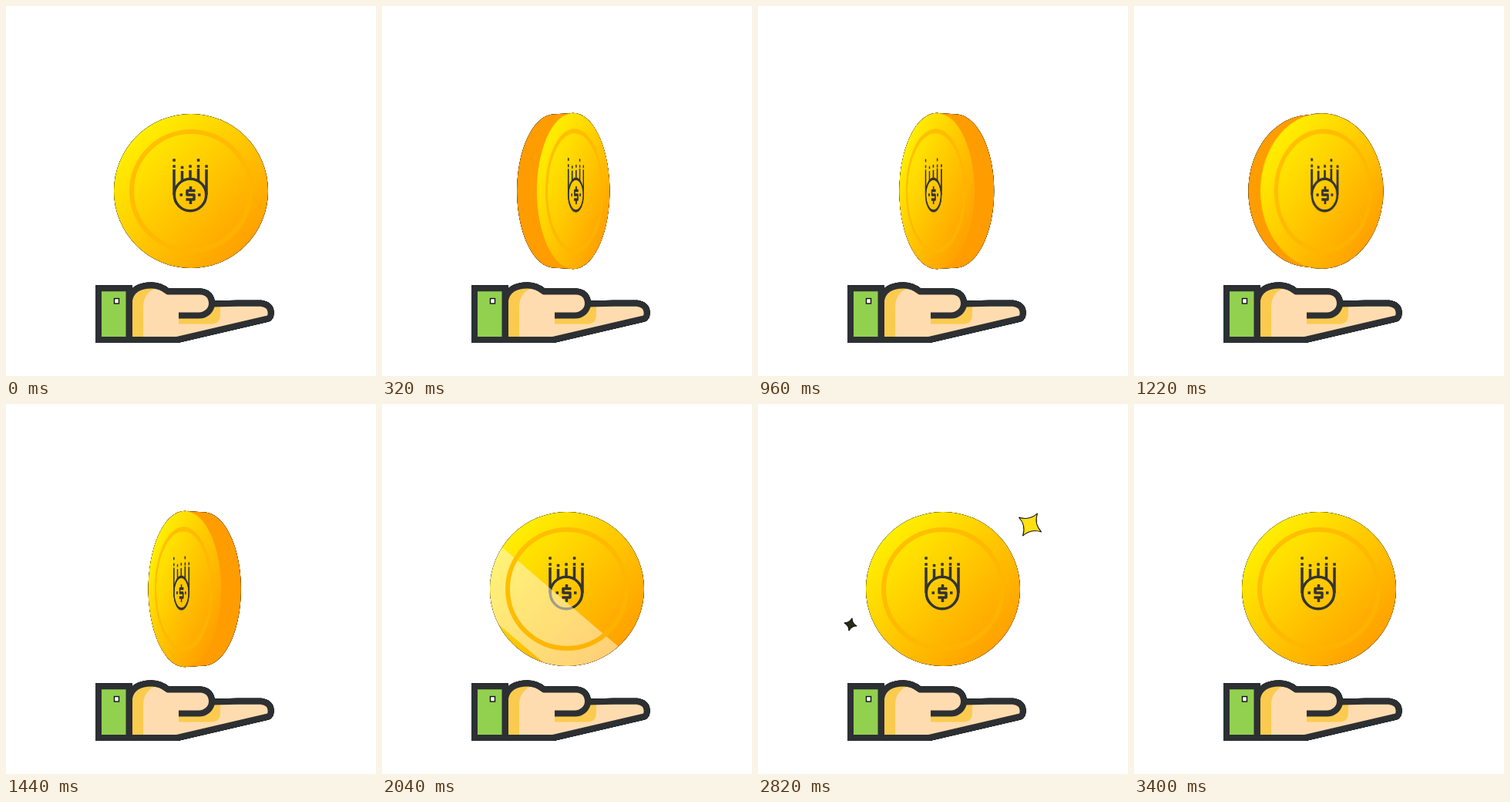
Write an HTML page with a canvas that moves like this. It is 480 px wide and 480 px high and loops after 3600 ms.

```html
<!DOCTYPE html>
<html lang="en">
<head>
<meta charset="utf-8">
<title>Spinning coin</title>
<style>
  html, body { margin: 0; width: 100%; height: 100%; overflow: hidden; background: #fff; }
  #stage { position: relative; width: 480px; height: 480px; overflow: hidden; }
  #stage > *, #coin > * { position: absolute; left: 0; top: 0; }
  .fringe { filter: drop-shadow(0 0 .5px #000) drop-shadow(0 0 .3px #000); }
  #coin { width: 480px; height: 480px; perspective: 1000px; }
  #coin #face { left: 140px; top: 140px; }
</style>
</head>
<body>
<div id="stage">
  <svg class="fringe" width="480" height="480" fill="none">
    <defs>
      <path id="palm" d="M160 382C162 370 171 362.5 189 362.5C198 362.5 204 365.5 210 370.5H252C262 371 267 377 267 386.5L300 385.8H331C339 387 343.5 391 343.5 397Q344 404 340 405.5L222 433H160Z"/>
    </defs>
    <use href="#palm" fill="#ffdcb0"/>
    <path fill="#fbcb4f" d="M162 432V378C168 366 182 364 192 367C182 372 178 380 178 392V432Z"/>
    <path fill="#fbcb4f" d="M224 400H250L268 388H278V402Q277 412.5 267 412.5H224Z"/>
    <path fill="#ffdcb0" d="M200 371H252C262 372 266 379 265 387C263 396 257 399 250 399H200Z"/>
    <g stroke="#2d3033" stroke-width="8" stroke-linejoin="round">
      <use href="#palm"/>
      <path d="M224 401.5H250C260 401.5 267 394 267 386"/>
      <path fill="#92d050" stroke-linejoin="miter" d="M120 366.3H159.5V433H120Z"/>
    </g>
    <rect x="140.5" y="379.5" width="6" height="6.5" fill="#fff" stroke="#111" stroke-width="1.4"/>
  </svg>

  <div id="coin" class="fringe">
    <canvas id="edge" width="480" height="480"></canvas>
    <svg id="face" width="200" height="200" fill="none">
      <defs>
        <linearGradient id="gold" x1=".13" y1=".13" x2=".87" y2=".87">
          <stop stop-color="#fff000"/><stop offset="1" stop-color="#ff9f00"/>
        </linearGradient>
        <linearGradient id="rim" x2="1" y2="1">
          <stop stop-color="#ffc200"/><stop offset="1" stop-color="#ffb000"/>
        </linearGradient>
        <clipPath id="disc"><circle cx="100" cy="100" r="100"/></clipPath>
      </defs>
      <circle cx="100" cy="100" r="100" fill="url(#gold)"/>
      <g stroke="#333" stroke-width="3.5">
        <circle cx="99" cy="105" r="20.7"/>
        <path d="M78 72V105M88.5 74V88M99 73V84M109.5 71V88M120 72V105"/>
        <path stroke-linejoin="round" d="M105.5 99.5H95V105H104V111H93.5M99.5 94V99M99.5 111V117"/>
        <path stroke-dasharray="3.5 50" d="M76.3 60h4M76.3 68h4M86.8 69.5h4M97.3 68h4M107.8 60h4M107.8 68h4M118.3 68h4M85.5 105h4M109 105h4"/>
      </g>
      <g clip-path="url(#disc)">
        <g transform="translate(100 100) rotate(40.5)">
          <rect id="shine" x="-120" width="240" height="79" fill="#fffae0" fill-opacity=".53"/>
        </g>
      </g>
      <circle cx="100" cy="100" r="77" stroke="url(#rim)" stroke-width="6"/>
    </svg>
  </div>

  <svg width="480" height="480" stroke="#111">
    <path id="starR" fill="#ffe014"/>
    <path id="starL" fill="#2b2b10"/>
  </svg>
</div>
<script>
const LOOP = 3600, STEP = 20;
const SPIN = 1760, RAMP = 312, TURN = 540;
const R = 100, HALF = 14, DEPTH = 1000, SIDES = 96;
const $ = id => document.getElementById(id);
const ctx = $('edge').getContext('2d');

// Constant speed with an even ramp at both ends.
function spinAngle(t) {
  if (t >= SPIN) return TURN;
  const v = TURN / (SPIN - RAMP);
  if (t < RAMP) return v * t * t / (2 * RAMP);
  if (t > SPIN - RAMP) return TURN - v * (SPIN - t) ** 2 / (2 * RAMP);
  return v * (t - RAMP / 2);
}

function track(keys, t) {
  if (t <= keys[0][0]) return keys[0][1];
  for (let i = 1; i < keys.length; i++) {
    const [t0, a] = keys[i - 1], [t1, b] = keys[i];
    if (t < t1) return a + (b - a) * (t - t0) / (t1 - t0);
  }
  return keys[keys.length - 1][1];
}

// Adds a polygon, always wound the same way so that overlaps merge.
function addPolygon(path, pts) {
  const area = pts.reduce((sum, [x, y], i) => {
    const [u, v] = pts[(i + 1) % pts.length];
    return sum + x * v - u * y;
  }, 0);
  const order = area < 0 ? [...pts].reverse() : pts;
  order.forEach((p, i) => i ? path.lineTo(...p) : path.moveTo(...p));
  path.closePath();
}

function drawEdge(phi, stretch) {
  ctx.clearRect(0, 0, 480, 480);
  if (Math.abs(phi) < 1e-4) return;
  const s = Math.sin(phi), c = Math.cos(phi);
  const ring = z => Array.from({ length: SIDES }, (_, i) => {
    const a = i / SIDES * 2 * Math.PI, x = R * Math.cos(a);
    const k = DEPTH / (DEPTH + HALF + x * s - z * c);
    return [240 + (x * c + z * s) * k, 240 + R * Math.sin(a) * k * stretch];
  });
  const front = ring(HALF), back = ring(-HALF), path = new Path2D();
  addPolygon(path, front);
  addPolygon(path, back);
  for (let i = 0; i < SIDES; i++) {
    const j = (i + 1) % SIDES;
    addPolygon(path, [front[i], front[j], back[j], back[i]]);
  }
  ctx.fillStyle = '#ff9c00';
  ctx.fill(path);
}

function drawCoin(t) {
  let deg = spinAngle(t) % 180;
  if (deg > 90) deg -= 180;
  const phi = deg * Math.PI / 180;
  const stretch = 1 + .018 * Math.sin(phi) ** 2;
  drawEdge(phi, stretch);
  $('face').style.transform =
    `scaleY(${stretch}) translateZ(${-HALF}px) rotateY(${deg}deg) translateZ(${HALF}px)`;
  $('shine').setAttribute('y', t < 1920 ? 110 : 100 - .72 * (t - 1920));
}

function drawStar(id, x, y, r, turn) {
  const star = $(id), q = r * .2;
  star.style.display = r > .3 ? '' : 'none';
  star.setAttribute('d', `M0 ${-r}Q${q} ${-q} ${r} 0Q${q} ${q} 0 ${r}Q${-q} ${q} ${-r} 0Q${-q} ${-q} 0 ${-r}Z`);
  star.setAttribute('transform', `translate(${x} ${y}) rotate(${turn})`);
}

const growR = [[2340, 0], [2460, 14], [2620, 17.5], [3060, 17.5], [3400, 0]];
const growL = [[2640, 0], [2820, 8.5], [2980, 9.5], [3160, 14.5], [3400, 0]];

function render(ms) {
  const t = Math.floor(ms % LOOP / STEP) * STEP;
  drawCoin(t);
  drawStar('starR', 353, 156.5, track(growR, t), 33);
  drawStar('starL', 120, 286, track(growL, t), 14);
}

const start = performance.now();
function tick() {
  render(performance.now() - start);
  requestAnimationFrame(tick);
}
tick();
</script>
</body>
</html>
```
